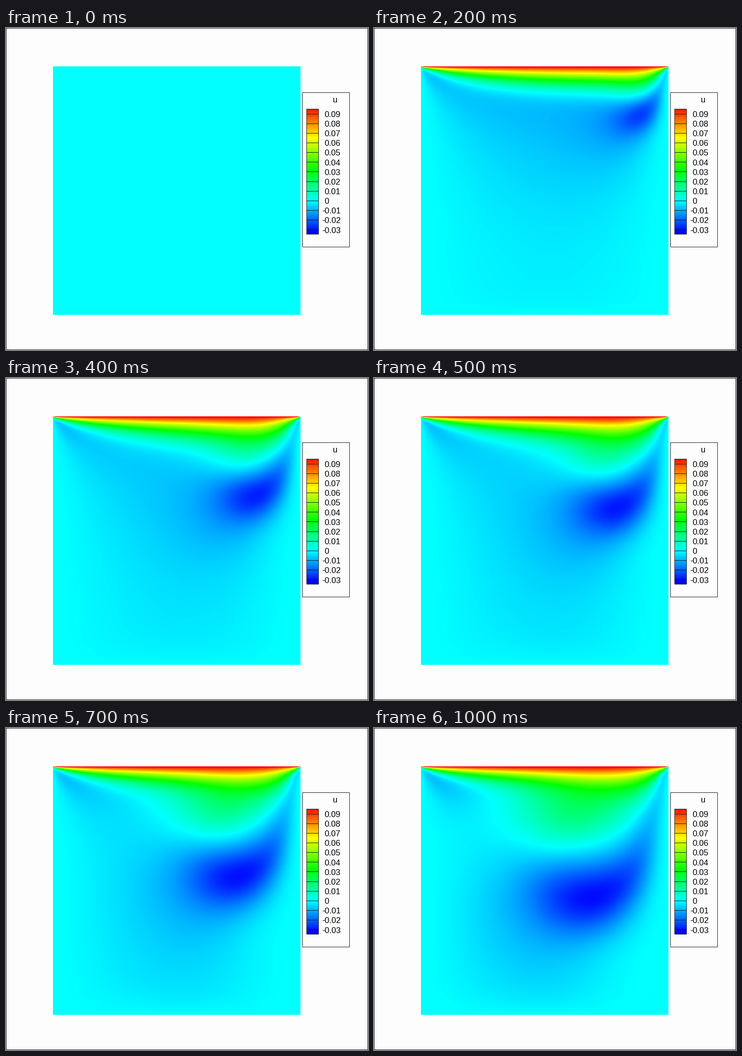
A matplotlib script for the animation above (1100 ms loop, 794x705 px).

```python
import numpy as np
import matplotlib.pyplot as plt
from matplotlib.animation import FuncAnimation
from matplotlib.colors import LinearSegmentedColormap
from matplotlib.patches import Rectangle

W, H, DPI = 794, 705, 64
PX = 72 / DPI                       # one pixel in points
FRAMES, INTERVAL = 11, 100
LID, RE = 0.1, 400
CELLS, DT = 128, 0.002
LEFT, TOP, COLS, ROWS = 103, 84, 543, 544
END_DEPTH, T_MAX = 0.522, 8         # the run ends when the trough of u is this deep


def simulate():
    """Lid-driven cavity from rest, in vorticity and stream function form."""
    n, h, nu = CELLS, 1 / CELLS, 1 / RE
    k = np.arange(1, n)
    sine = np.sqrt(2 / n) * np.sin(np.pi * np.outer(k, k) / n)
    lam = (2 - 2 * np.cos(np.pi * k / n)) / h**2
    den = lam[:, None] + lam
    psi, w, u = (np.zeros((n + 1, n + 1)) for _ in range(3))
    depth = 1 - np.linspace(0, 1, n + 1)
    inner = np.s_[1:-1, 1:-1]
    history, last = [u.copy()], None
    u[-1, 1:-1] = 1

    for step in range(1, int(T_MAX / DT) + 1):
        psi[inner] = sine @ ((sine @ w[inner] @ sine) / den) @ sine
        w[0] = -2 * psi[1] / h**2
        w[-1] = -2 * psi[-2] / h**2 - 2 / h
        w[:, 0] = -2 * psi[:, 1] / h**2
        w[:, -1] = -2 * psi[:, -2] / h**2

        north, south = w[2:, 1:-1], w[:-2, 1:-1]
        east, west = w[1:-1, 2:], w[1:-1, :-2]
        ux = (psi[2:, 1:-1] - psi[:-2, 1:-1]) / (2 * h)
        vy = (psi[1:-1, :-2] - psi[1:-1, 2:]) / (2 * h)
        rate = (nu * (north + south + east + west - 4 * w[inner]) / h**2
                - (ux * (east - west) + vy * (north - south)) / (2 * h))
        last = rate if last is None else last
        w[inner] += DT * (1.5 * rate - 0.5 * last)
        last = rate

        if step % 10 == 0:
            u[inner] = ux
            history.append(u.astype(np.float32))
            rows = np.nonzero(u < 0.9 * u.min())[0]
            if depth[rows].mean() >= END_DEPTH:
                break
    return history


def lerp(count):
    """Matrix of linear weights from the grid nodes to count samples."""
    pos = np.linspace(0, CELLS, count)
    return np.maximum(0, 1 - abs(pos[:, None] - np.arange(CELLS + 1)))


def make_fields():
    history = simulate()
    down, across = lerp(ROWS), lerp(COLS).T
    picks = np.linspace(0, len(history) - 1, FRAMES).round().astype(int)
    return [LID * (down @ history[i] @ across)[::-1] for i in picks]


fields = make_fields()

fig = plt.figure(figsize=(W / DPI, H / DPI), dpi=DPI, facecolor="#fdfdfd")
ax = fig.add_axes([0, 0, 1, 1])
ax.axis("off")
ax.set_xlim(0, W)
ax.set_ylim(H, 0)

rainbow = LinearSegmentedColormap.from_list(
    "rainbow5", ["#0000ff", "#00ffff", "#00ff00", "#ffff00", "#ff0000"], N=512)
line = dict(lw=PX, color="#101010", snap=False)


def heat(values, x, y):
    return fig.figimage(values, x, H - y - len(values), cmap=rainbow,
                        vmin=-0.033, vmax=0.098, origin="upper", zorder=-1)


def box(x0, y0, x1, y1):
    ax.add_patch(Rectangle((x0, y0), x1 - x0, y1 - y0, fill=False, **line))


def label(x, y, text):
    ax.text(x, y, text, family="Liberation Sans", size=18 * PX, color="black",
            ha="left", va="baseline")


field = heat(fields[0], LEFT, TOP)
box(0.5, 0.5, W - 0.5, H - 0.5)

# Legend
box(650.5, 141.5, 753.5, 479.5)
label(716.5, 163, "u")
heat(np.repeat(np.linspace(0.0952, -0.0344, 274)[:, None], 27, axis=1), 659, 177)
box(659.5, 177.5, 685.5, 451.5)
for i in range(13):
    level = 9 - i
    y = 188 + 21.15 * i
    line_y = np.floor(y) + 0.5
    ax.plot([659.5, 685.5], [line_y, line_y], **line)
    label(698.2 if level >= 0 else 693, y + 6.8,
          f"{level / 100:.2f}" if level else "0")


def draw(i):
    field.set_data(fields[i])
    return [field]


anim = FuncAnimation(fig, draw, frames=FRAMES, interval=INTERVAL,
                     repeat=True, repeat_delay=0, blit=False)
plt.show()
```
